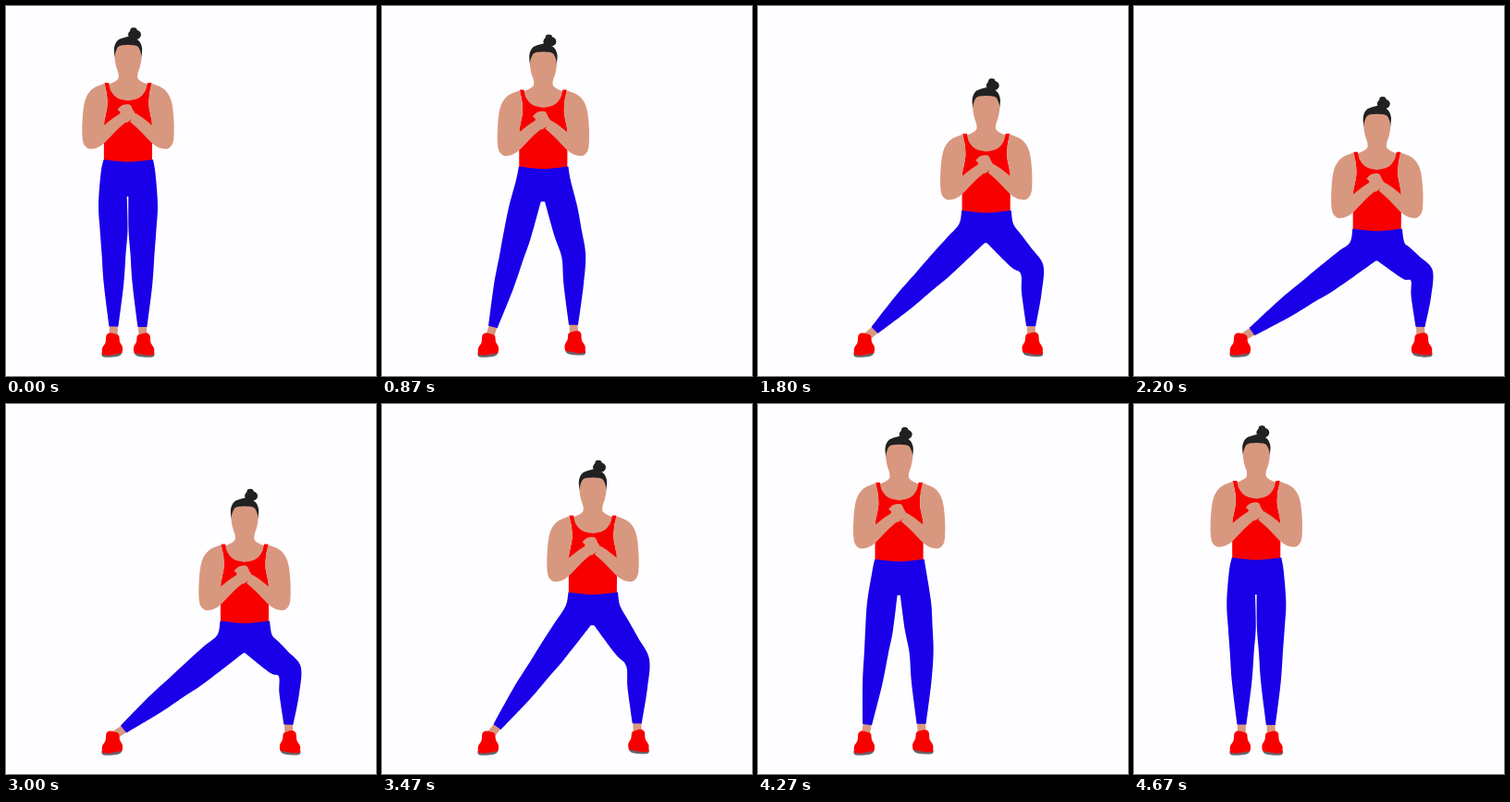
An HTML page with a canvas that plays this animation: 400 px wide and 400 px high, repeating every 4.74 s.

```html
<!DOCTYPE html>
<html lang="en">
<head>
<meta charset="utf-8">
<title>Side lunge</title>
<style>
  html, body { margin: 0; width: 100%; height: 100%; overflow: hidden; background: #fefdff; }
  canvas { display: block; }
</style>
</head>
<body>
<canvas id="stage" width="400" height="400"></canvas>
<script>
const ctx = document.getElementById('stage').getContext('2d');
const LOOP = 4740, STEP = 200 / 3, LAST_STEP = 70, REACH = 165;
const RED = '#f90000', BLUE = '#1900e8', SKIN = '#d8987f', HAIR = '#212122', SOLE = '#66666a';

const points = (...n) => n.flatMap((x, i) => i % 2 ? [] : [[x, n[i + 1]]]);
const mirror = pts => pts.map(([x, y]) => [264 - x, y]).reverse();

// Left halves of the symmetric parts
const FACE = points(105, 86, 114, 83.5, 121, 79, 121.5, 73, 119, 65, 117.5, 55, 119.5, 47, 123, 43, 132, 42);
const HAIR_TOP = points(117.5, 55, 117, 45, 121, 37, 132, 33);
const ARMHOLE = points(106, 129, 107.5, 119, 109.5, 108, 109, 96, 106.5, 83);
const SCOOP = points(111, 83, 113.5, 92, 120.5, 99.5, 132, 102.5);
const ARM = points(107, 83.5, 93, 90, 85.5, 102, 82.7, 122, 82.7, 143, 86, 152, 93, 154.5, 104, 150, 120, 134, 130, 125);
const FOREARM = points(124, 116, 116, 121, 106, 129);
const HANDS = points(120.5, 112, 124.5, 108, 130, 106.3, 134.5, 107, 137, 112, 140, 118, 135, 123, 129, 126, 122, 121, 123.5, 115, 120.5, 112);
const SHOE = points(104, 377, 104, 370, 107.5, 364, 108.5, 356, 112, 353.5, 118, 354.5, 122, 356.5, 123, 363, 126, 369, 125.5, 375);

// Each run of points is a smooth curve; runs meet at corners.
function shape(color, ...runs) {
  ctx.beginPath();
  for (const run of runs) {
    ctx.lineTo(...run[0]);
    for (let i = 0; i < run.length - 1; i++) {
      const a = run[i], b = run[i + 1], p = run[i - 1] || a, q = run[i + 2] || b;
      ctx.bezierCurveTo(a[0] + (b[0] - p[0]) / 6, a[1] + (b[1] - p[1]) / 6,
        b[0] - (q[0] - a[0]) / 6, b[1] - (q[1] - a[1]) / 6, ...b);
    }
  }
  ctx.fillStyle = color;
  ctx.fill();
}

function oval(color, x, y, rx, ry) {
  ctx.beginPath();
  ctx.ellipse(x, y, rx, ry, 0, 0, 7);
  ctx.fillStyle = color;
  ctx.fill();
}

function drawTorso() {
  shape(HAIR, HAIR_TOP, mirror(HAIR_TOP));
  oval(HAIR, 139, 31, 7, 5.5);
  oval(HAIR, 138, 26.5, 3.7, 3.2);
  shape(SKIN, FACE, mirror(FACE), points(146, 105, 118, 105));
  const side = [[106, 167], ...ARMHOLE];
  shape(RED, side, SCOOP, mirror(SCOOP), mirror(side), points(158, 167, 132, 169.5, 106, 167));
  const arm = [ARM, FOREARM, ARMHOLE];
  shape(SKIN, ...arm);
  shape(SKIN, ...arm.map(mirror).reverse());
  shape(SKIN, HANDS);
}

function drawFoot(ankle, x, y, side) {
  ctx.strokeStyle = SKIN;
  ctx.lineWidth = 9;
  ctx.beginPath();
  ctx.moveTo(...ankle);
  ctx.lineTo(...side([[116, 359]]).map(([px, py]) => [px + x, py + y])[0]);
  ctx.stroke();
  ctx.save();
  ctx.translate(x, y);
  shape(SOLE, side(points(103.5, 375, 104.5, 379, 113, 379.8, 123, 378, 125.5, 374)));
  shape(RED, side(SHOE), side(points(125.5, 375, 118, 376.5, 111, 377.7, 104, 377)));
  ctx.restore();
}

const lerp = (a, b, t) => [a[0] + (b[0] - a[0]) * t, a[1] + (b[1] - a[1]) * t];
const angle = (a, b) => Math.atan2(b[1] - a[1], b[0] - a[0]);

// Outline of a leg from hip to ankle; side is -1 for left, 1 for right
function leg(hip, knee, ankle, side) {
  const thigh = angle(hip, knee), shin = angle(knee, ankle);
  const stations = [
    [lerp(hip, knee, 0.3), thigh, 16.5],
    [lerp(hip, knee, 0.65), thigh, 15],
    [knee, (thigh + shin) / 2, 13],
    [lerp(knee, ankle, 0.42), shin, 10.7],
    [ankle, shin, 5]
  ];
  const edge = sign => stations.map(([[x, y], a, w]) =>
    [x + sign * w * Math.sin(a), y - sign * w * Math.cos(a)]);
  return { outer: edge(side), inner: edge(-side).slice(1) };
}

// Ease in and out, running a little ahead so the far end is softer
function ease(x) {
  const u = Math.min(Math.max(x, 0), 1);
  return (1 - Math.cos(Math.PI * (u + 0.1 * Math.sin(Math.PI * u)))) / 2;
}

function draw(time) {
  const s = time < 2550 ? ease((time - 80) / 2420) : ease((4720 - time) / 2120);
  const slide = REACH * s;
  const lift = -2.5 * Math.sin(Math.PI * s);
  const dx = slide * (0.71 + 0.105 * s ** 4), dy = 57 * s ** 2 + 23 * s ** 8;
  const onBody = (x, y) => [x + dx, y + dy];

  // The left leg stays straight, the right knee bends over its foot.
  const leftHip = onBody(116.5, 192), heel = [116.5, 360];
  const leftAnkle = lerp(heel, leftHip, 13.5 / Math.hypot(leftHip[0] - heel[0], leftHip[1] - heel[1]));
  const rightAnkle = [147.5 + slide, 347 + lift];
  const rightKnee = [147.5 + slide + 0.02 * dy, 268 + 0.31 * dy];
  const left = leg(leftHip, lerp(leftHip, leftAnkle, 0.49), leftAnkle, -1);
  const right = leg(onBody(147.5, 192), rightKnee, rightAnkle, 1);
  const crotchY = 206 - 5.5 * s, gap = 0.8 + 1.5 * Math.sin(Math.PI * s);

  ctx.fillStyle = '#fefdff';
  ctx.fillRect(0, 0, 400, 400);
  ctx.save();
  ctx.translate(dx, dy);
  drawTorso();
  ctx.restore();

  drawFoot(lerp(leftAnkle, leftHip, 0.01), 0, 0, pts => pts);
  drawFoot(lerp(rightAnkle, rightKnee, 0.02), slide, lift, mirror);
  shape(BLUE,
    [onBody(105.5, 166), onBody(102.5, 181), ...left.outer],
    [...left.inner.reverse(), onBody(131.5 - gap, crotchY)],
    [onBody(131.5 + gap, crotchY), ...right.inner],
    [...right.outer.reverse(), onBody(161.5, 181), onBody(159, 166)],
    [onBody(159, 166), onBody(132, 168.5), onBody(105.5, 166)]);
}

function tick() {
  const step = Math.floor((performance.now() % LOOP + 5) / STEP);
  draw(Math.min(step, LAST_STEP) * STEP);
  requestAnimationFrame(tick);
}
tick();
</script>
</body>
</html>
```
